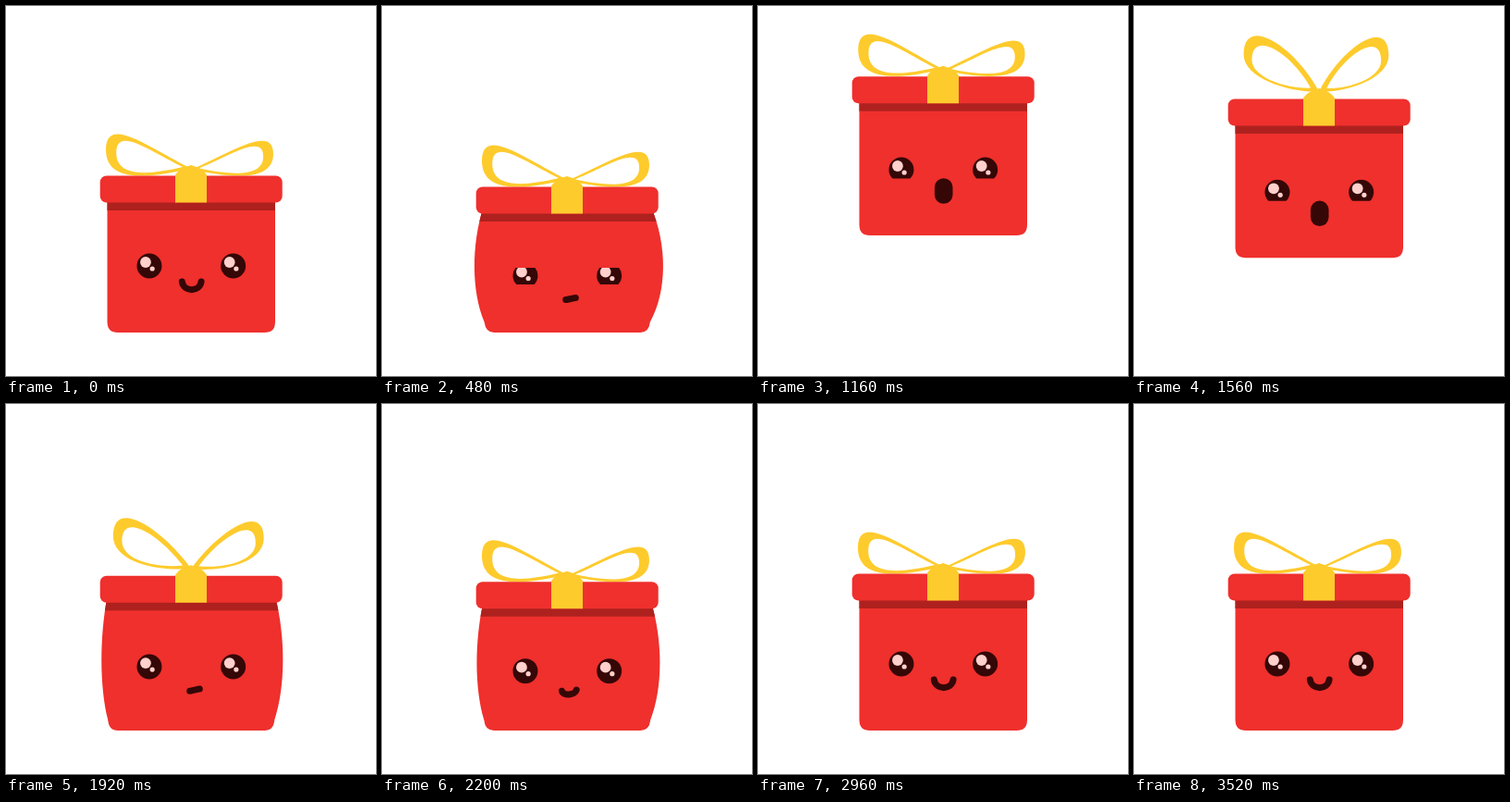
Recreate the animation shown at these times as an HTML page with a canvas. Size 400 by 400 pixels, loop 3.56 s.

```html
<!DOCTYPE html>
<html lang="en">
<head>
<meta charset="utf-8">
<title>Jumping gift</title>
<style>
html, body { margin: 0; width: 100%; height: 100%; overflow: hidden; background: #fff; }
canvas { display: block; width: 100vmin; height: 100vmin; }
</style>
</head>
<body>
<canvas id="stage" width="400" height="400"></canvas>
<script>
const ctx = document.getElementById('stage').getContext('2d');
const LOOP = 3560, STEP = 40;
const RED = '#ef302d', SHADE = '#ae211e', GOLD = '#fecb2d', DARK = '#350706', SHINE = '#ffd0cc';
const LID_TOP = 183.5, LID_HEIGHT = 29, FLOOR = 353, CENTER = 200.3;

const mix = (a, b, k) => a + (b - a) * k;

// Eased step from 0 to 1.
function ramp(t, from, to) {
  const u = Math.min(1, Math.max(0, (t - from) / (to - from)));
  return u * u * (3 - 2 * u);
}

// Rises from 0 to 1, holds, and falls back.
const hump = (t, rise, full, fall, end) => ramp(t, rise, full) - ramp(t, fall, end);

function jump(t) {
  const start = 545, peak = 1160, land = 1900, height = 105;
  if (t < start || t > land) return 0;
  return t < peak
    ? height * (1 - Math.pow((peak - t) / (peak - start), 3.87))
    : height * (1 - Math.pow((t - peak) / (land - peak), 2.38));
}

function pose(t) {
  const body = -jump(t);
  const air = hump(t, 560, 680, 1860, 1960);
  const squash = hump(t, 0, 450, 490, 640) + hump(t, 1860, 2040, 2060, 2470);
  const swell = hump(t, 0, 440, 490, 600) + hump(t, 1800, 2000, 2060, 2470);
  return {
    bottom: FLOOR + body,
    lidTop: LID_TOP + body + 12 * squash - 2.3 * air,
    face: body + 10.5 * squash + air,
    bulge: 9.7 * swell - 9.5 * hump(t, 590, 740, 760, 1120),
    lift: 1.35 * hump(t, 1100, 1760, 1760, 2120) - 0.4 * hump(t, 480, 660, 660, 1120),
    upperLid: hump(t, 160, 420, 500, 600),
    lowerLid: hump(t, 160, 420, 1760, 1880),
    pout: hump(t, 140, 300, 2120, 2280),
    gasp: hump(t, 550, 630, 1800, 1880)
  };
}

// Teardrop with its tip at the knot; lift bends it from lying flat to standing up.
function teardrop(lift) {
  const at = (flat, raised) => mix(flat, raised, lift);
  const width = -mix(92, 82, Math.max(0, lift));
  ctx.moveTo(0, -8);
  ctx.bezierCurveTo(at(-45, -27), at(-30, -56), width, at(-67, -91), width, at(-28, -47));
  ctx.bezierCurveTo(width, at(8, -20), at(-45, -30), at(3, -6), 0, -8);
}

function drawLoop(lift, sx, sy) {
  ctx.save();
  ctx.scale(sx, sy);
  ctx.beginPath();
  teardrop(lift);
  ctx.translate(-9, -3.4 - 2.3 * lift);
  ctx.scale(0.78, 0.76);
  teardrop(lift);
  ctx.fill('evenodd');
  ctx.restore();
}

function drawLoops(lidTop, lift) {
  const open = Math.max(0, lift);
  ctx.save();
  ctx.translate(200, lidTop);
  ctx.fillStyle = GOLD;
  drawLoop(lift, 1, 1);
  drawLoop(lift, -mix(0.967, 0.927, open), mix(0.84, 0.97, open));
  ctx.restore();
}

function drawRibbon(lidTop) {
  ctx.save();
  ctx.translate(200, lidTop);
  ctx.fillStyle = GOLD;
  ctx.beginPath();
  ctx.moveTo(-17, LID_HEIGHT);
  ctx.lineTo(-17, -1);
  ctx.quadraticCurveTo(-13, -8, 0, -11.5);
  ctx.quadraticCurveTo(13, -8, 17, -1);
  ctx.lineTo(17, LID_HEIGHT);
  ctx.fill();
  ctx.restore();
}

function bodyPath({ lidTop, bottom, bulge }) {
  const left = 109.5, right = 291, corner = 11.5;
  const top = lidTop + 22, low = bottom - corner;
  const y1 = mix(top, low, 0.33), y2 = mix(top, low, 0.73);
  const inset = bulge * 0.11;
  const bl = bulge * 4 / 3, br = bl * (bulge > 0 ? 1.35 : 1);
  ctx.beginPath();
  ctx.moveTo(left, top);
  ctx.bezierCurveTo(left - bl, y1, left - bl, y2, left + inset, low);
  ctx.quadraticCurveTo(left + inset * 2.5, bottom, left + corner, bottom);
  ctx.lineTo(right - corner, bottom);
  ctx.quadraticCurveTo(right - inset * 2.5, bottom, right - inset, low);
  ctx.bezierCurveTo(right + br, y2, right + br, y1, right, top);
}

function drawBox(p) {
  ctx.save();
  bodyPath(p);
  ctx.fillStyle = RED;
  ctx.fill();
  ctx.clip();
  ctx.fillStyle = SHADE;
  ctx.fillRect(90, p.lidTop, 220, LID_HEIGHT + 8.5);
  ctx.restore();
  ctx.fillStyle = RED;
  ctx.beginPath();
  ctx.roundRect(101.7, p.lidTop, 197, LID_HEIGHT, 7);
  ctx.fill();
}

function disc(x, y, r, color) {
  ctx.fillStyle = color;
  ctx.beginPath();
  ctx.arc(x, y, r, 0, Math.PI * 2);
  ctx.fill();
}

function drawEye(x, upper, lower) {
  const top = 267 + 5.5 * upper, bottom = 295 - 4.5 * lower;
  ctx.save();
  ctx.beginPath();
  ctx.rect(x - 15, top, 30, bottom - top);
  ctx.clip();
  disc(x, 281, 13.5, DARK);
  disc(x - 4, 277, 5.9, SHINE);
  disc(x + 3.2, 284, 2.6, SHINE);
  ctx.restore();
}

function drawGasp(open) {
  const w = 19.6 * mix(0.6, 1, open), h = 27.5 * open;
  ctx.fillStyle = DARK;
  ctx.beginPath();
  ctx.roundRect(200.7 - w / 2, 304 - h / 2, w, h, Math.min(w, h) / 2);
  ctx.fill();
}

// A smile that shrinks into a short slanted line.
function drawSmile(pout) {
  const x = mix(200.7, 204, pout), y = mix(298, 306, pout);
  const half = mix(10.4, 5.3, pout), tilt = 1.1 * pout, sag = 11.5 * (1 - pout);
  ctx.strokeStyle = DARK;
  ctx.lineWidth = 7;
  ctx.lineCap = 'round';
  ctx.beginPath();
  ctx.moveTo(x - half, y + tilt);
  ctx.bezierCurveTo(x - half * 0.84, y + sag + tilt, x + half * 0.84, y + sag - tilt, x + half, y - tilt);
  ctx.stroke();
}

function draw(t) {
  const p = pose(t);
  ctx.fillStyle = '#fff';
  ctx.fillRect(0, 0, 400, 400);
  drawLoops(p.lidTop, p.lift);
  drawBox(p);
  drawRibbon(p.lidTop);
  ctx.save();
  ctx.translate(0, p.face);
  for (const side of [-1, 1]) drawEye(CENTER + 45.35 * side, p.upperLid, p.lowerLid);
  if (p.gasp > 0.3) drawGasp(p.gasp);
  else drawSmile(p.pout);
  ctx.restore();
}

let origin = null;
function tick(now) {
  origin ??= now;
  draw(Math.floor(((now - origin) % LOOP) / STEP) * STEP);
  requestAnimationFrame(tick);
}
draw(0);
requestAnimationFrame(tick);
</script>
</body>
</html>
```
